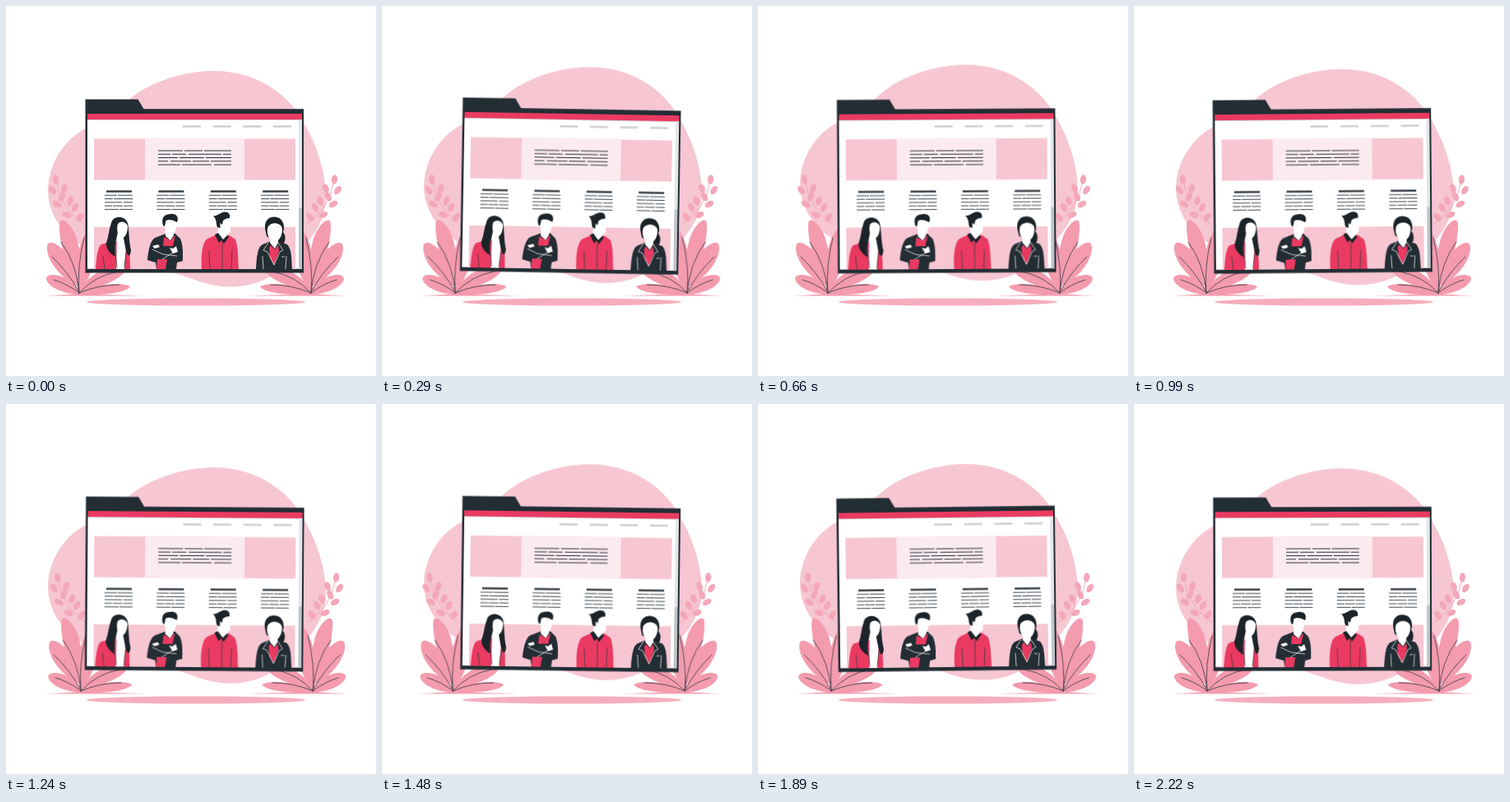
Animation, 450 px wide and 450 px high, one loop 2.26 s. Source, as an HTML page:

```html
<!DOCTYPE html>
<html lang="en">
<head>
<meta charset="utf-8">
<title>Team page</title>
<style>
  html, body { margin: 0; width: 100%; height: 100%; overflow: hidden; background: #fff; }
  svg { display: block; width: 100vw; height: 100vh; }
  #window { transform-origin: 229px 219px; }
  .soft { fill: #f6c6d2; }
  .leaf { fill: #f49bae; }
  .sprig { fill: #f3a7b8; }
  .red { fill: #ea3a61; }
  .dark { fill: #232d34; }
  .black { fill: #1c2429; }
  .white { fill: #fff; }
  .line { fill: none; stroke: #3a3a44; stroke-width: .8; stroke-linecap: round; }
  .pale { fill: none; stroke: #fff; stroke-width: .7; }
</style>
</head>
<body>
<svg viewBox="0 0 450 450">
  <path id="blob" class="soft" d="M51 224C52 186 76 156 106 145C128 138 143 116 166 102C194 86 225 79 253 79C308 79 347 110 365 147C378 170 389 202 389 232C389 272 357 298 337 318C318 335 294 341.500 272 341.500C235 341 215 322 170 318C110 310 52 280 51 224Z"/>
  <ellipse cx="231" cy="360" rx="133" ry="4.6" fill="#f5aebd"/>

  <g id="plants">
    <g id="plant">
      <g id="sprig" class="sprig">
        <path d="M61 212Q66 246 95 266" fill="none" stroke="#f3a7b8"/>
      </g>
      <path class="leaf" d="M45 352.500Q70 351.500 90 349.500Q130 351.500 168 352.500Z"/>
      <g class="leaf">
        <path d="M90 342C76 324 64 290 65 265C66 256 75 262 81 272C90 286 92 312 90 342Z"/>
        <path d="M88 341C66 331 49 309 50 293C51 283 62 289 70 297C80 307 87 322 88 341Z"/>
        <path d="M90 350C72 352 49 341 49 331C51 324 66 327 75 332C83 337 88 343 90 350Z"/>
        <path d="M88 348C83 322 87 286 100 272C113 262 116 290 108 312C103 326 97 339 88 348Z"/>
        <path d="M88 349C97 329 122 314 140 318C153 323 132 338 88 349Z"/>
        <path d="M88 350C108 338 140 335 151 341C147 349 112 353 88 350Z"/>
      </g>
      <path class="line" d="M89 349Q86 318 95 282M89 349Q86 313 67 287M89 348Q76 324 56 305M89 349Q75 338 58 333M89 349Q108 328 136 323M89 349Q112 339 138 339"/>
    </g>
    <use href="#plant" transform="translate(460 0) scale(-1 1)"/>
  </g>

  <g id="window">
    <path class="dark" d="M96.5 113.500H160.500L167.500 125.300H362V324.500H96.5Z"/>
    <path class="red" d="M99 131H360V138.300H99Z"/>
    <path class="white" d="M99 138.300H360V319.800H99Z"/>
    <path fill="#e3e5e8" d="M356 138.300H360V319.800H356Z"/>
    <path fill="#bfc4c7" d="M356 245.500H360V319.800H356Z"/>
    <path class="soft" d="M107 161.500H352V211.500H107ZM107 268.800H352V319.800H107Z"/>
    <path d="M169 160.800H290V211.800H169Z" fill="#fbeaef"/>
    <g id="copy"></g>

    <g>
      <path class="red" d="M109 320C110 304 112 292 116 290L130 286L147 288C151 297 151 310 151 320Z"/>
      <path class="white" d="M135 278L143 277L146 292L144 320H134Z"/>
      <path class="black" d="M128 264C130 255 144 254 148 264C150 273 149 284 152 297C151 307 148 304 146 298L142 277L136 275C134 285 131 294 133 305C126 301 121 294 122 288C125 280 125 272 128 264Z"/>
      <path class="white" d="M136 265C140 260 147 263 148 268C148 276 145 282 140 283C136 281 134 271 136 265Z"/>
      <path class="line" d="M118 304L120 320M132 290L135 318M146 300L144 318"/>
    </g>

    <g>
      <path class="dark" d="M183 320L182 312L172 309C173 298 175 286 181 282L194 277H206L212 283C216 292 215 304 215 310L208 312L207 320Z"/>
      <path class="red" d="M192 281L200 285L206 279L203 292H191ZM184 308H196L194 320H183Z"/>
      <path class="white" d="M194 272H204V279L200 285L194 280Z"/>
      <path class="white" d="M192.500 262C193 256 207 255 207.500 261C208 270 206 277 201 278.500C195 277 192 270 192.500 262Z"/>
      <path class="black" d="M191 267C188 256 194 253 200 253C206 252 211 256 208 263Q200 258 194.500 261L193 268Z"/>
      <path class="white" d="M178 292L185 290L187 293L181 295ZM199 294L203 295L207 292L209 299L203 301Z"/>
      <path class="pale" d="M178 296L191 302L208 304M190 308L203 300"/>
    </g>

    <g>
      <path class="red" d="M238 320C237 302 239 287 245 283L256 278L272 279L279 284C283 295 282 309 283 320Z"/>
      <path class="white" d="M258 270H269V280L265 285L257 279Z"/>
      <path class="white" d="M260 260C263 256 272 256 272.500 261L273 270C274 276 271 278.500 267 277C261 275 258 268 260 260Z"/>
      <path class="black" d="M257 269C255 264 257 261 252 255C257 256 260 251 266 250.500C271 250 273 254 272 258Q267 258 264 261L263 266L260.500 264V270Z"/>
      <path class="black" d="M254 278L258 276L264 284L269 279L271 281L265 289L262 285L259 288Z"/>
      <path class="line" d="M263 288V320M247 298L248 320M275 297L274 320"/>
    </g>

    <g>
      <path class="black" d="M315.500 273C313 260 321 256 327 256.500C337 257 340 268 337 275C341 279 340 288 336 291L328 286L317 280Z"/>
      <path class="dark" d="M304 320C305 304 306 293 312 290L322 286L333 287L342 290C348 296 347 309 348 320Z"/>
      <path class="white" d="M322 280H331V288L327 295L321 288Z"/>
      <path class="red" d="M320 294L322 291L327 296L331 291L332 298L326 315L321 306Z"/>
      <path class="white" d="M318 271C319 262 335 262 336 271C336 280 332 286 327 286.500C321 286 317 279 318 271Z"/>
      <path class="pale" d="M319 288L313 297L318 299L326 315L333 299L337 297L331 288M312 304L313 320M341 304L340 320M335 305H339"/>
    </g>
  </g>
</svg>
<script>
const NS = 'http://www.w3.org/2000/svg';
const LOOP = 2260;
const INK = '#2b343b';
const $ = id => document.getElementById(id);

function add(parent, tag, attrs) {
  const el = document.createElementNS(NS, tag);
  for (const k in attrs) el.setAttribute(k, attrs[k]);
  $(parent).append(el);
}

function rule(x, y, w, weight, color, dash = 'none') {
  add('copy', 'path', {
    d: `M${x} ${y}h${w}`, stroke: color, 'stroke-width': weight, 'stroke-dasharray': dash
  });
}

// Page copy: navigation, captions and banner lines
for (let i = 0; i < 4; i++) {
  rule(215 + i * 36.7, 146.5, 22, 2.3, '#cbcbcb');
  const x = 120 + i * 63.4;
  rule(x + 2, 225.5, 31, 2.3, INK);
  ['15 1 18', '10 1 23', '21 1.5 12', '9 1 12 1 11', '17 1 16'].forEach((dash, row) =>
    rule(x, 230.2 + row * 4.3, 34, .9, INK, dash));
}
['30 2 22 2 33', '15 2 17 3 40 2 10', '24 2 30 2 31', '12 3 25 2 20 2 25', '27 2 36 3 21']
  .forEach((dash, row) => rule(185, 176 + row * 4.25, 89, 1, INK, dash));

// Small leaves along the sprig: x, y, tilt
[[60.5, 211, -5], [71, 222, 20], [56.5, 224, -35], [68, 232, 25], [62, 241, -60],
 [78, 237, 20], [84, 245, 30], [74, 254, -65], [90, 257, 35]].forEach(([x, y, tilt]) =>
  add('sprig', 'ellipse', { rx: 3.6, ry: 5.8, transform: `translate(${x} ${y}) rotate(${tilt})` }));

function play(id, duration, frames) {
  $(id).animate(frames, { duration, iterations: Infinity });
}

play('blob', LOOP / 2, [0, -9, 0].map(y => ({ transform: `translateY(${y}px)` })));

play('window', LOOP / 2, [0, 1, 0, -1, 0].map(deg => ({ transform: `rotate(${deg}deg)` })));

play('plants', LOOP, [0, -1, 2, -4, 4, -4, 4, -4, 2, -1, 0].map(x => ({
  transform: `translateX(${x}px)`, easing: 'cubic-bezier(.36,.07,.19,.97)'
})));
</script>
</body>
</html>
```
